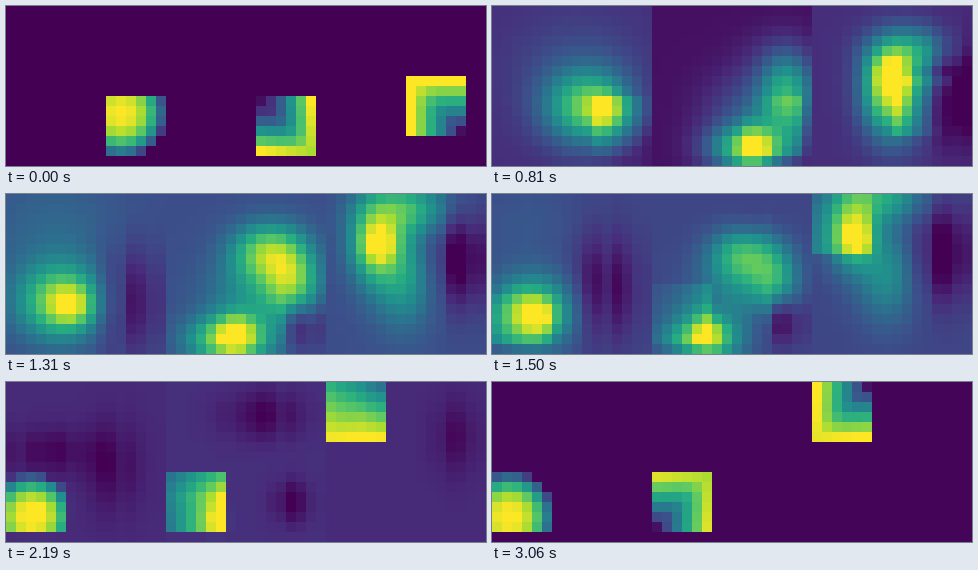
An HTML page with a canvas that plays this animation: 480 by 160 pixels, repeating every 3120 ms.

```html
<!DOCTYPE html>
<html>
<head>
<meta charset="utf-8">
<title>Three drifting heat maps</title>
<style>
html, body { margin: 0; width: 100%; height: 100%; overflow: hidden; background: #440154; }
canvas { display: block; }
</style>
</head>
<body>
<canvas id="stage" width="480" height="160"></canvas>
<script>
const ctx = document.getElementById('stage').getContext('2d');
const LOOP = 3120, HOLD = 310, STEP = 62.44;
const CELL = 10, GRID = 16, PATCH = 6;

const viridis = [
  [68, 1, 84], [71, 44, 122], [59, 81, 139], [44, 113, 142], [33, 144, 141],
  [39, 173, 129], [92, 200, 99], [170, 220, 50], [253, 231, 37]
];

const mix = (a, b, t) => a + (b - a) * t;
const clamp = v => Math.max(0, Math.min(1, v));
const ramp = (from, to, v) => clamp((v - from) / (to - from));
const smooth = (from, to, v) => {
  const t = ramp(from, to, v);
  return t * t * (3 - 2 * t);
};
const noise = n => {
  const v = Math.sin(n * 12.9898) * 43758.5453;
  return v - Math.floor(v);
};

function color(value) {
  const pos = clamp(value) * (viridis.length - 1);
  const i = Math.min(viridis.length - 2, Math.floor(pos));
  return `rgb(${viridis[i].map((c, n) => Math.round(mix(c, viridis[i + 1][n], pos - i)))})`;
}

// Patch textures in local cells: a soft disc, and a ramp rising away from one corner.
const disc = (cx, cy, radius) => (u, v) =>
  1 - Math.min(1, Math.hypot(u - cx, v - cy) / radius) ** 2.4;

const corner = (cx, cy, power, dim) => (u, v) => {
  const dx = Math.abs(u - cx), dy = Math.abs(v - cy);
  const reach = Math.min(5, (dx ** 6 + dy ** 6) ** (1 / 6));
  return 0.04 + 0.96 * (reach / 5) ** power * (1 - dim * Math.min(dx, dy) / 5);
};

// A soft spot travels from one point to another while it swells and fades.
const spot = (from, to, size, amount, rise = [0, 9], fall = [19, 32], lift = 0) =>
  ({ from, to, size, amount, rise, fall, lift });

const panels = [
  {
    start: [10, 9], end: [0, 9], wake: 0, settled: 37,
    leaving: disc(1, 1.2, 4.75),
    arriving: (u, v) => 0.85 * disc(2.2, 4, 4.4)(u, v),
    final: disc(1.2, 4, 4.75),
    spots: [
      spot([12, 11], [2.5, 12], [3, 2.6], 0.58, [0, 9], [19, 32], 2),
      spot([14.5, 11], [3, 12.5], [1.4, 1.3], 0.3, [3, 9], [19, 32], 2),
      spot([11, 7], [2, 2], [5, 4], 0.1, [0, 9], [17, 24]),
      spot([17, 16], [10, 8], [2.4, 3.8], -0.17, [5, 17], [25, 37]),
      spot([4, 6.5], [4, 6.5], [3, 1.6], -0.11, [22, 30], [31, 37])
    ]
  },
  {
    start: [9, 9], end: [0, 9], wake: 6, settled: 42,
    leaving: corner(0, 0, 1.4, 0.13),
    arriving: (u, v) => (0.3 + 0.55 * u / 5) * mix(0.65, 1, Math.min(1, v / 2)),
    final: (u, v) => 0.94 * corner(0, 5, 1, 0.08)(u, v),
    spots: [
      spot([13.8, 8], [11.5, 8.5], [1.9, 2.8], 0.5, [0, 9], [18, 26]),
      spot([13.5, 4], [8, 5.8], [2.4, 2], 0.5, [8, 17], [19, 30]),
      spot([11.5, 13.5], [3.8, 14.3], [2.8, 1.6], 0.6, [0, 9], [18, 27]),
      spot([12, 14], [4.5, 13.2], [1.1, 1.2], 0.32, [3, 9], [26, 34]),
      spot([11, 10.5], [7, 10], [3.3, 3], 0.24, [0, 9], [18, 28]),
      spot([15.5, 15], [12, 11.5], [1.6, 1.8], -0.24, [9, 17], [24, 38]),
      spot([9, 2.8], [9, 2.8], [2.8, 1.7], -0.11, [17, 26], [31, 38])
    ]
  },
  {
    start: [8, 7], end: [0, 0], wake: 0, settled: 37,
    leaving: corner(5, 5, 0.95, 0),
    arriving: (u, v) => mix(0.45 - 0.15 * u / 5, 0.85, v / 5),
    final: corner(5, 0, 0.95, 0.05),
    spots: [
      spot([9, 10.5], [2.8, 2.2], [1.8, 2.8], 0.52),
      spot([9.2, 7.5], [3.3, 3.5], [1.2, 1.3], 0.28, [3, 9]),
      spot([11.5, 6.5], [6, -1], [3, 1.8], 0.4, [0, 9], [19, 28]),
      spot([8.5, 9.5], [6.8, 7.5], [2.2, 3.4], 0.3, [0, 9], [19, 30]),
      spot([14.5, 9], [12.5, 5], [2, 3.4], -0.24, [5, 9], [19, 37])
    ]
  }
];

function sample(texture, [left, top], x, y) {
  const u = x - left, v = y - top;
  return u >= 0 && v >= 0 && u < PATCH && v < PATCH ? texture(u, v) : 0;
}

// Freeze a spot at one step; dark spots get uneven vertical streaks.
function shapeSpot({ from, to, size, amount, rise, fall, lift }, step) {
  const travel = ramp(3, 22, step);
  const fading = ramp(...fall, step);
  const cx = mix(from[0], to[0], travel);
  const cy = mix(from[1], to[1], travel) - lift * Math.sin(Math.PI * travel);
  const [rx, ry] = size.map(s => s * mix(1, 0.6, fading));
  const level = amount * ramp(...rise, step) * (1 - fading);
  return (x, y) => {
    const streak = amount < 0 ? 0.65 + 0.7 * noise(x + 1) : 1;
    return level * streak * Math.exp(-(((x - cx) / rx) ** 2 + ((y - cy) / ry) ** 2) / 2);
  };
}

function drawPanel(panel, index, step) {
  const settling = ramp(30, panel.settled, step);
  const background = (0.24 * smooth(panel.wake, 17, step) - 0.08 * ramp(17, 26, step))
    * (1 - settling) ** 2 + 0.012 * settling;
  const startWeight = 1 - smooth(0, 12, step);
  const endWeight = ramp(17, 31, step);
  const landing = (u, v) => mix(panel.arriving(u, v), panel.final(u, v), settling);
  const spots = panel.spots.map(s => shapeSpot(s, step));

  for (let y = 0; y < GRID; y++) {
    for (let x = 0; x < GRID; x++) {
      const value = spots.reduce((sum, glow) => sum + glow(x, y), background)
        + startWeight * sample(panel.leaving, panel.start, x, y)
        + endWeight * sample(landing, panel.end, x, y);
      ctx.fillStyle = color(value);
      ctx.fillRect((index * GRID + x) * CELL, y * CELL, CELL, CELL);
    }
  }
}

function stepAt(ms) {
  const t = Math.floor((ms % LOOP) / 10) * 10;
  return t < HOLD ? 0 : 1 + Math.floor((t - HOLD) / STEP);
}

let origin = null, shown = -1;
function frame(now) {
  if (origin === null) origin = now;
  const step = stepAt(now - origin);
  if (step !== shown) {
    panels.forEach((panel, i) => drawPanel(panel, i, step));
    shown = step;
  }
  requestAnimationFrame(frame);
}
requestAnimationFrame(frame);
</script>
</body>
</html>
```
